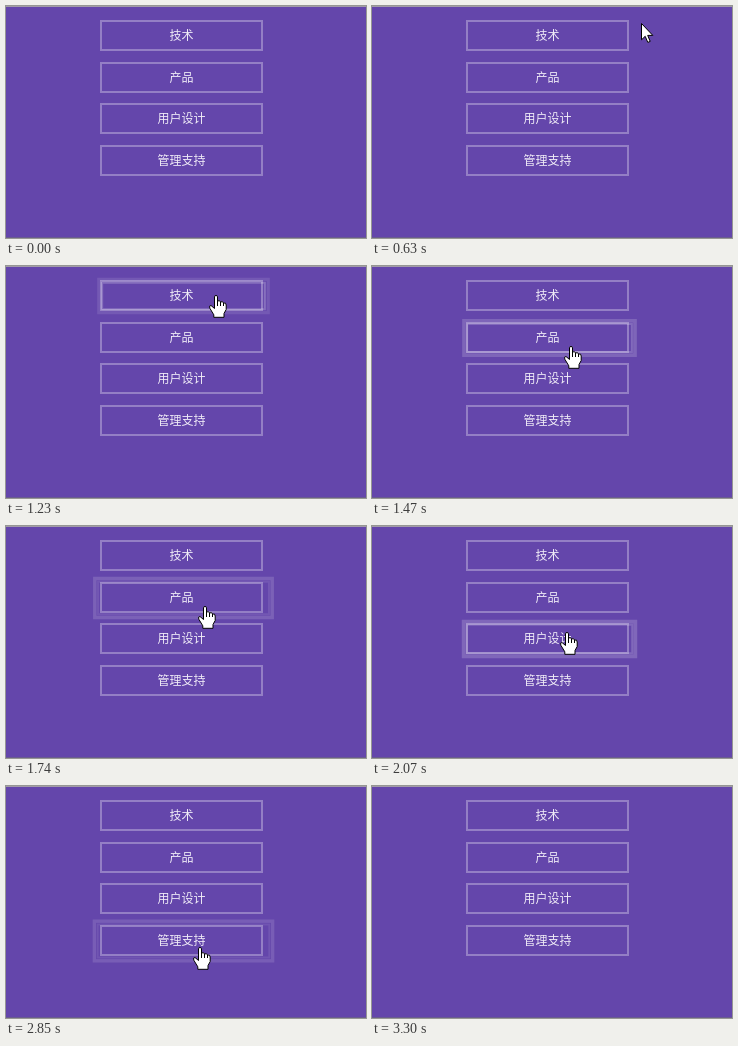
An HTML page for the animation above (3690 ms loop, 360 by 232 pixels).

```html
<!DOCTYPE html>
<html lang="zh-CN">
<head>
<meta charset="utf-8">
<title>按钮悬停波纹</title>
<style>
  html, body { margin: 0; width: 100%; height: 100%; overflow: hidden; background: #6446ab; }
  svg { display: block; width: 360px; height: 232px; }
  text { font: 12px "Noto Sans CJK SC", "Noto Sans CJK", sans-serif; fill: #f0ecf7; text-anchor: middle; }
  .box, .ring { fill: none; stroke: #fff; }
  .box { stroke-width: 2; stroke-opacity: .31; }
  #cursor path { fill: #fff; stroke: #000; stroke-linejoin: round; }
</style>
</head>
<body>
<svg viewBox="0 0 360 232">
  <rect width="360" height="232" fill="#6446ab"/>
  <rect width="360" height="1" fill="#a29ca8"/>
  <rect y="231" width="360" height="1" fill="#6a5c90"/>
  <g id="buttons"></g>
  <g id="rings">
    <rect id="inner" class="ring"/>
    <rect id="outer" class="ring"/>
  </g>
  <g id="cursor">
    <path id="arrow" d="M.5 .5V16.8L4.2 13.3L6.8 19.4L9.2 18.4L6.7 12.4H11.8Z"/>
    <path id="hand" d="M-1.5 1.8Q-1.5 .5 0 .5T1.5 1.8V6Q4 4.8 4.5 7Q7 5.8 7.5 8Q10.2 7.3 10.2 10V14.5L8 18.5V22.3H-2.2V19.8L-6.2 13.2Q-7.3 10.5 -5 10.5L-1.5 13.5ZM1.5 6V11M4.5 7V11M7.5 8V11"/>
  </g>
</svg>
<script>
const LOOP = 3690, STEP = 30, PULSE = 480;
const VISIT = 540, REST = 330;
const LEFT = 94, WIDTH = 163, HEIGHT = 31;
const labels = ['技术', '产品', '用户设计', '管理支持'];
const tops = labels.map((_, i) => Math.round(14 + 41.6 * i));

// Pointer stops (time, x, y): enter, rest on each button in turn, leave
const restY = [29, 80, 106, 161];
const visits = restY.flatMap((y, i) => {
  const t = 900 + VISIT * i, x = 194 + 16 * .3 ** i;
  return [[t, x, y], [t + REST, x, y]];
});
const path = [
  [420, 357, 14], [630, 269, 17],
  ...visits,
  [2940, 214, 177], [3090, 325, 170], [3300, 360, 154]
];

const $ = id => document.getElementById(id);
const lerp = (a, b, k) => a + (b - a) * k;
const smooth = k => k * k * (3 - 2 * k);
const set = (el, attrs) => { for (const k in attrs) el.setAttribute(k, attrs[k]); };
const show = (id, on) => { $(id).style.display = on ? '' : 'none'; };

function add(tag, attrs) {
  const el = document.createElementNS('http://www.w3.org/2000/svg', tag);
  set(el, attrs);
  return $('buttons').appendChild(el);
}

labels.forEach((label, i) => {
  add('text', { x: 175.5, y: tops[i] + 20 }).textContent = label;
  add('rect', { class: 'box', x: LEFT + 1, y: tops[i] + 1, width: WIDTH - 2, height: HEIGHT - 2 });
});

function pointer(t) {
  const i = path.findIndex(p => p[0] > t);
  if (i < 1) return null;
  const [a, b] = [path[i - 1], path[i]];
  const k = smooth((t - a[0]) / (b[0] - a[0]));
  return [lerp(a[1], b[1], k), lerp(a[2], b[2], k)];
}

function hovered(t) {
  const p = pointer(t);
  if (!p || p[0] < LEFT || p[0] >= LEFT + WIDTH) return -1;
  return tops.findIndex(top => p[1] >= top && p[1] < top + HEIGHT);
}

// Rectangle around the ring centre, given its outer half sizes
function frame(el, cy, halfW, halfH, line, alpha) {
  const w = halfW - line / 2, h = halfH - line / 2;
  set(el, {
    x: 177.5 - w, y: cy - h, width: 2 * w, height: 2 * h,
    'stroke-width': line, 'stroke-opacity': alpha
  });
}

function drawRing(over, t) {
  show('rings', over >= 0);
  if (over < 0) return;
  let since = t;
  while (hovered(since - STEP) === over) since -= STEP;
  const p = (t - since) % PULSE / PULSE;
  const cy = tops[over] + 16, halfW = 86 + 5.5 * p, halfH = 18 + 4 * p;
  const swell = Math.sin(Math.PI * p);
  frame($('outer'), cy, halfW, halfH, 3 + swell, .08 + .12 * swell);
  frame($('inner'), cy, halfW - 4, halfH - 4, 2, lerp(.24, .06, p));
}

function draw(now) {
  const t = Math.floor(now % LOOP / STEP) * STEP;
  const p = pointer(t), over = hovered(t);
  drawRing(over, t);
  show('cursor', p);
  show('arrow', over < 0);
  show('hand', over >= 0);
  if (p) set($('cursor'), { transform: `translate(${Math.round(p[0])} ${Math.round(p[1])})` });
}

const start = performance.now();
function tick() {
  draw(performance.now() - start);
  requestAnimationFrame(tick);
}
tick();
</script>
</body>
</html>
```
